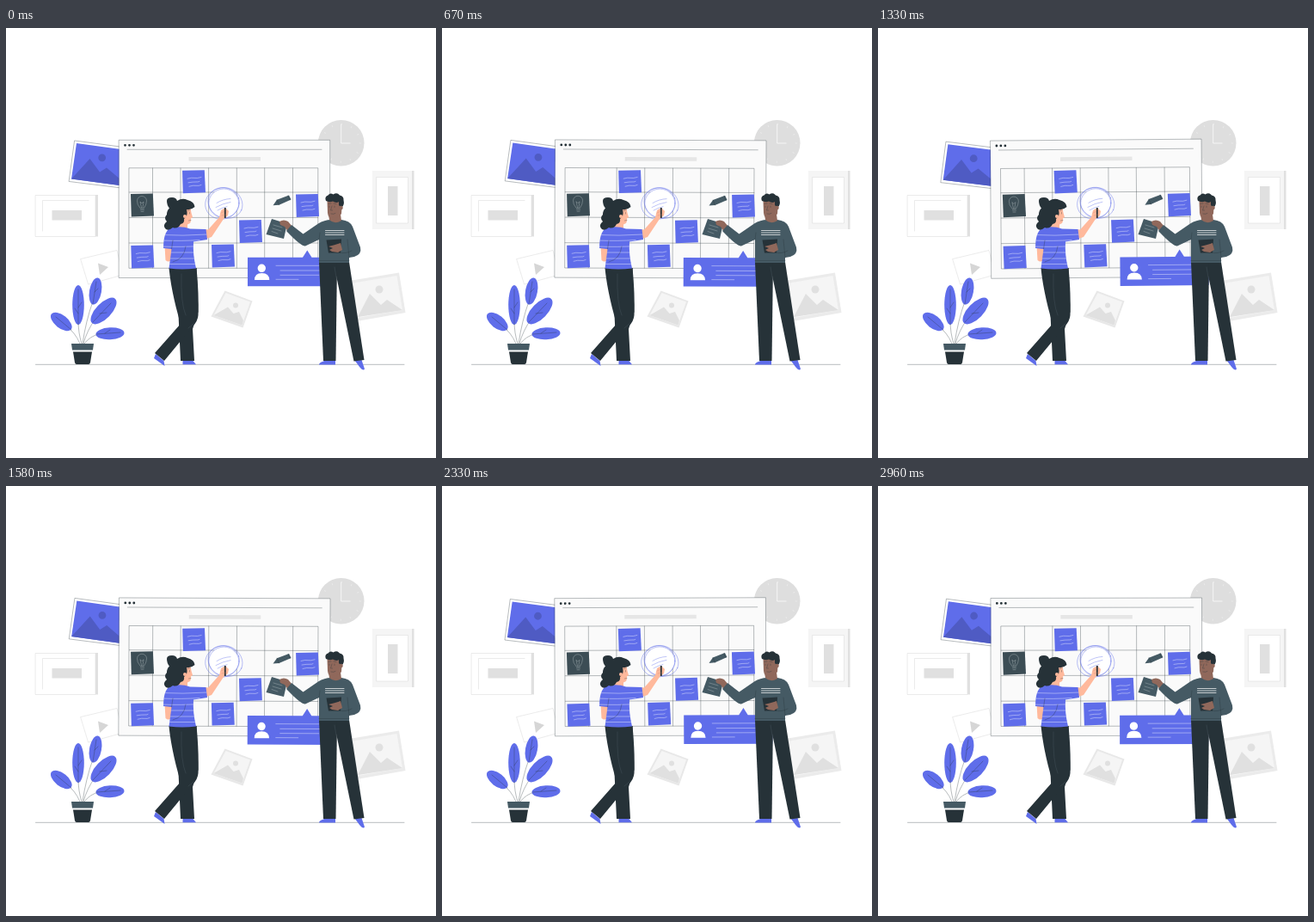
An HTML page that plays this animation: 500x500 px, repeating every 3000 ms.

```html
<!DOCTYPE html>
<html lang="en">
<head>
<meta charset="utf-8">
<title>Planning board</title>
<style>
html, body { margin: 0; height: 100%; overflow: hidden; background: #fff; }
svg { display: block; width: 100vw; height: 100vh; }
.blue { fill: #5f6dea; }
.shade { fill: #4f5bc3; }
.dark { fill: #263238; }
.slate { fill: #455a64; }
.pale { fill: #f5f5f5; }
.grey { fill: #e0e0e0; }
.skin { fill: #ffb99c; }
.brown { fill: #90685b; }
.ink, .chalk, .scrawl, .mist { fill: none; stroke-linecap: round; }
.ink { stroke: #263238; stroke-width: .33; }
.chalk { stroke: #fff; stroke-width: .4; }
.scrawl { stroke: #5f6dea; stroke-width: .4; }
.mist { stroke: #dedede; stroke-width: .6; }
.seam { stroke: #526068; }
.soft { stroke: #b5bfc3; }
</style>
</head>
<body>
<svg viewBox="0 0 500 500">
  <defs>
    <path id="sheet" d="M0 .6L25.8 0L27 26L.8 27Z"/>
    <g id="note">
      <use href="#sheet" class="blue"/>
      <path class="chalk" d="M6 10q5-1.5 8-.8t8-.9M7 14.6q6-1 9-.8t4-.6M8 19q5-1.5 8-.9t6-.8"/>
    </g>
    <clipPath id="shirtClip"><use href="#shirt"/></clipPath>
  </defs>

  <!-- wall -->
  <g>
    <path class="mist" d="M34.5 194.5H104V242.5H34.5ZM42.5 236V200.5H96"/>
    <path class="grey" d="M104 194H107V242.5H104Z"/>
    <path class="grey" d="M53.5 212H88V223.5H53.5Z"/>
    <path class="pale" d="M426 166H472V234H426Z"/>
    <path class="grey" d="M472 166H474.5V234H472Z"/>
    <path class="mist" style="fill:#fff" d="M431 173.5H467.5V227H431Z"/>
    <path class="grey" d="M444 184H455.5V218H444Z"/>
    <circle cx="389.7" cy="133.7" r="26.8" fill="#dedede"/>
    <circle cx="389.7" cy="133.7" r="22" fill="none" stroke="#f0f0f0" stroke-width="2" stroke-dasharray=".6 10.92"/>
    <path class="chalk" style="stroke-width:.7" d="M389.7 112V134H400"/>
    <path class="mist" d="M87 268.5L129 258.5L136 287L96 298Z"/>
    <path fill="#d6d6d6" d="M107 273.5L119 278L109 287Z"/>
    <path fill="#e8e8e8" d="M254.5 305.5L286.5 317.5L275.5 348.5L238.5 335.5Z"/>
    <path class="pale" d="M255.5 308L284 318.5L274.5 345.5L241.5 334Z"/>
    <path class="grey" d="M241.5 334L258 324.5L264.5 332L271 330L276 340L274.5 345.5Z"/>
    <circle class="grey" cx="267" cy="322.5" r="3"/>
    <path fill="#ebebeb" d="M402 293.5L457 284.5L464.5 331L408 341Z"/>
    <path class="pale" d="M404 296.5L454.5 288L461 328L409 337Z"/>
    <path class="grey" d="M409 336L423 309L436 322L443 316L461 328Z"/>
    <circle class="grey" cx="434" cy="304" r="4.5"/>
  </g>
  <path class="ink" d="M34.5 391.3H463"/>

  <!-- swaying board -->
  <g id="board">
    <path class="ink" style="fill:#fff" d="M80 131L140 139L134 186L73.5 178.5Z"/>
    <path class="blue" d="M82 134L137 141.5L132 183L76 175.5Z"/>
    <path class="shade" d="M76 175.5L97.5 152L109 167.5L117 162.5L133 176L132 183Z"/>
    <circle class="shade" cx="111.7" cy="150.8" r="4.4"/>
    <path class="ink" style="fill:#fafafa" d="M131.5 130.3H376.7V290.5H131.5Z"/>
    <path stroke="#263238" stroke-width="2.8" stroke-linecap="round" stroke-dasharray="0 5" d="M138.5 136.3H149"/>
    <path class="ink" d="M141 141.3H367"/>
    <path fill="#e6e6e6" d="M212.5 150H296V154.5H212.5Z"/>
    <path class="ink" d="M143.3 162.8H362.8V279.3H143.3ZM143.3 191H362.8M143.3 220.4H362.8M143.3 250H362.8M170.5 163V279M203 163V279M235.6 163V279M268.3 163V279M300.7 163V279M333.5 163V279"/>
    <use href="#note" x="205" y="165.2"/>
    <use href="#note" x="337" y="193"/>
    <use href="#note" x="271" y="223"/>
    <use href="#note" x="239" y="251.5"/>
    <use href="#note" x="145.3" y="252.5"/>
    <use href="#sheet" x="145" y="192.5" class="slate" style="fill:#3c4d55"/>
    <path class="chalk soft" d="M156 209.5Q152 205 152.5 201A5.5 5.5 0 0 1 163.5 201Q163.5 205 160.5 209.5ZM156.5 211.5H160.5M157 213.5H160M157.5 209L156 202L158 204L160 202L159 209"/>
    <ellipse class="scrawl" style="fill:#fff" cx="253.3" cy="203.8" rx="17.5" ry="16.8"/>
    <ellipse class="scrawl" cx="251.5" cy="204" rx="20" ry="18" transform="rotate(-18 251.5 204)"/>
    <ellipse class="scrawl" cx="255" cy="203.5" rx="20.5" ry="17.5" transform="rotate(24 255 203.5)"/>
    <path class="scrawl" d="M245 203.5Q252 199 261 198.5M244 208.5Q252 204 261 202.5M246 212Q251 209 257 207.5"/>
    <path class="slate" d="M310.5 206.3L315 199.8L329 194.5L331.5 199.5L317.5 205.7Z"/>
    <path class="ink" d="M315 199.8L317.5 205.7M328 195L330 200"/>
    <path class="blue" d="M281 266.8H345L350.3 258.5L355.5 266.8H384V300.3H281Z"/>
    <circle cx="297.3" cy="279.3" r="4.7" fill="#fff"/>
    <path fill="#fff" d="M289 293Q289 285 297.5 285T306.3 293Z"/>
    <path class="chalk" d="M314 276.3H384M319 282H384M319 287.3H364M314 292.3H340"/>
  </g>

  <!-- plant -->
  <g>
    <path class="ink" d="M86 367Q80 353 70 347M88 367Q84 355 84 340M89 367Q93 340 101 318M90 367Q94 352 104 338M91 367Q98 358 108 356"/>
    <g class="blue">
      <ellipse cx="64.3" cy="341.5" rx="14.5" ry="7.5" transform="rotate(38 64.3 341.5)"/>
      <ellipse cx="84" cy="322" rx="6.8" ry="23"/>
      <ellipse cx="104" cy="306" rx="7" ry="15.8" transform="rotate(10 104 306)"/>
      <ellipse cx="113.5" cy="329" rx="19.5" ry="9" transform="rotate(-46 113.5 329)"/>
      <ellipse cx="121" cy="355.3" rx="16.5" ry="7" transform="rotate(-3 121 355.3)"/>
    </g>
    <path class="ink" d="M76 351L58 336M84 345V304M101 321L105 295M101 342L122 320M105 356L133 354M84 332L80 326M84 325L88 319M103 307L107 303M109 332L117 331M115 355L121 351"/>
    <path class="slate" d="M76 367H102L101 374.5H77Z"/>
    <path class="dark" d="M78 376.5H100L98 389Q97.500 391 96 391H82Q80.500 391 80 389Z"/>
  </g>

  <!-- woman -->
  <g>
    <path class="blue" d="M174 379L183.5 387L184.5 393L172 384ZM205.5 386.500H217L221 391.300H205.500Z"/>
    <path class="dark" d="M198 279H221.5L223.5 330L217 350L219 387H203Z"/>
    <path class="dark" d="M189.5 279H221.5Q224.500 310 223.5 334Q223 341 217 347L184 387L173 378L203 344C199 330 192 305 189.5 279Z"/>
    <path class="ink seam" d="M204 286Q203 320 209 334M218 344L212 349"/>
    <path class="skin" d="M184.5 253L193.5 254L194 268Q190 274 185.5 270Z"/>
    <path class="skin" d="M230 234L235 234.5L248 220L250 212L255 209L259 213L258 218L253 222L239 243L230 246Z"/>
    <path class="skin" d="M202 226L211 225V233Q206 237 200 233Z"/>
    <path id="shirt" class="blue" d="M191 232.5Q204 229.5 214 233.5L232.5 234L234 246L218 248.5Q217 263 221 279.5Q205 281.5 189.5 279.5L192.5 257L183 256Q183 237 191 232.5Z"/>
    <g clip-path="url(#shirtClip)">
      <path class="chalk" d="M180 240.5Q205 242 234 240M180 247Q205 248 225 246.5M180 254Q205 255 225 253.5M186 261H225M186 268H225M186 274.5H225"/>
    </g>
    <path class="ink" d="M194 272Q207 269 209 254M192.5 257L194 247"/>
    <path class="skin" d="M203 207H214L215.5 215L217 220L215 221.5Q215.5 227 212 228Q207 230 203 224Z"/>
    <path class="dark" d="M187 201Q187 197 193 197Q198 197 199 201Q205 197 211 200Q219 202 219.5 208Q215 212 210 211Q212 219 207 222Q208 227 203 228Q200 234 194 232Q188 237 185 233Q182 229 187 225Q183 221 187 217Q187 212 190 209.5Q187 206 187 201Z"/>
    <circle class="skin" cx="208" cy="219" r="2"/>
    <path class="ink" d="M213.5 214.5V216M211 212.5L214 212M212.5 224L215 223.5"/>
    <path d="M254.8 209V221" stroke="#263238" stroke-width="1.8"/>
    <path class="ink" style="stroke:#c9826b" d="M250 215L254 213M251 218L256 217"/>
  </g>

  <!-- man -->
  <g>
    <path class="blue" d="M369.5 386.5H383V391.5H364Q364 389 369.5 387.500ZM405.500 386.500L413.500 386L417 396.500Q415.500 399.500 411 394Z"/>
    <path class="dark" d="M382 272H399L416.5 386L404.5 387.5L383 283Z"/>
    <path class="dark" d="M364 272H385L383.5 387H369Z"/>
    <path class="ink seam" d="M382 278L384 290"/>
    <path class="slate" d="M302.5 240L309 222L327 227.5L323 245Z"/>
    <path class="chalk soft" d="M311 229L321 232M310 233L320 236M309 236.5L316 239"/>
    <path class="brown" d="M318 225Q323 222 328 225L333 231L328 237L324 231L319 229Z"/>
    <path class="slate" d="M332 229L345.5 239.5L363 227.5Q370 223 378 223H390Q400 224 403 231L412 255Q414 263 405 266L399 267V273H364V246L348 253.5Q343 254 326 236Z"/>
    <path class="ink" d="M364 246L365 238M399 267L397 246M364 270.5H399"/>
    <path class="brown" d="M375 217H389L390 224Q382 229 376 223Z"/>
    <path class="brown" d="M373.5 201Q382 198 391 202L390 216Q387 221 380 221Q374.5 221 374 215Z"/>
    <path class="dark" d="M372 201Q370 196 374.5 194.500Q377 191 380.500 193.500Q385 190.500 388 194.500Q393 195.500 392.500 200Q394 206 390 209L387 206V202Q384 204 380 201.500Q376 203 372 201Z"/>
    <circle class="brown" cx="389.5" cy="209" r="2.3"/>
    <path class="ink" d="M376 207V208.5M382 207V208.5M375 204.5L378 204M381 204L384 204.5M379 207L377.5 212H379.5M378 216Q381 217 383 215.5"/>
    <path class="chalk" style="stroke-width:.7" d="M371.5 235.5H393M371.5 238H393M371.5 240.5H393"/>
    <path class="dark" d="M372.5 246.5L390 245.5L389 261.5H375Z"/>
    <path class="brown" d="M375 254L381 252.5L389 250L391 258L386 261L379 260L376 258L380 256Z"/>
    <path class="ink" d="M388 261Q395 263 402 259"/>
  </g>
</svg>
<script>
const board = document.getElementById('board');
const period = 1500;

// Triangle wave: 0, 1, 0, -1 degrees at each quarter
function sway(t) {
  const p = (t / period) % 1;
  return p < .25 ? 4 * p : p < .75 ? 2 - 4 * p : 4 * p - 4;
}

function draw(t) {
  board.setAttribute('transform', `rotate(${sway(t)} 228.5 216)`);
  requestAnimationFrame(draw);
}
requestAnimationFrame(draw);
</script>
</body>
</html>
```
